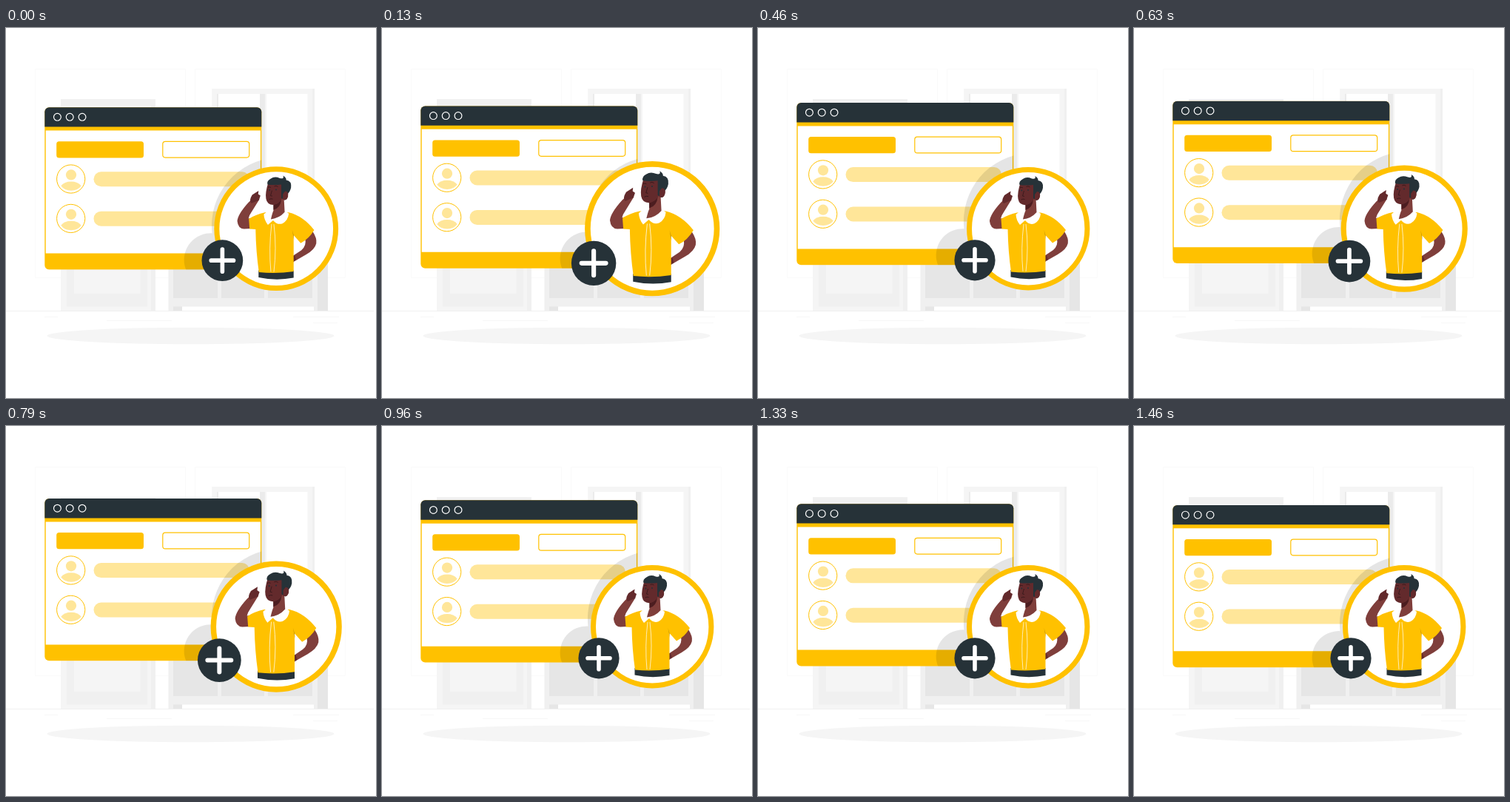
Animation of 500x500 px, one loop 1500 ms. Source, as an HTML page:

```html
<!DOCTYPE html>
<html lang="en">
<head>
<meta charset="utf-8">
<title>Add user</title>
<style>
  html, body { margin: 0; width: 100%; height: 100%; overflow: hidden; background: #fff; }
  svg { display: block; width: 100%; height: 100%; }
</style>
</head>
<body>
<svg viewBox="0 0 500 500" fill="none">
  <defs>
    <clipPath id="windowShape"><rect x="52.3" y="107.3" width="293" height="219.3" rx="6"/></clipPath>
    <g id="row">
      <circle cx="87.7" cy="204.2" r="19.1" fill="#fff" stroke="#ffc100"/>
      <circle cx="88" cy="198.6" r="7.1" fill="#ffe699"/>
      <path d="M74.3 213.5Q79 207.6 88 207.6T101.7 213.5Q97 220 88 220T74.3 213.5Z" fill="#ffe699"/>
      <rect x="118.5" y="194.4" width="210.5" height="20" rx="10" fill="#ffe699"/>
    </g>
  </defs>

  <g id="room">
    <path d="M39.5 55.5H242.5V337.5H39.5ZM255.5 55.5H458.5V337.5H255.5Z" stroke="#fafafa"/>
    <path d="M74 96.500H202V383H74Z" fill="#f0f0f0"/>
    <path d="M74 96.500H196V383H74Z" fill="#f5f5f5"/>
    <path d="M74 96.500H202V105H74Z" fill="#f0f0f0"/>
    <path d="M82 110H191V376.500H82Z" fill="#f0f0f0"/>
    <path d="M92 120H181.500V359H92Z" fill="#f5f5f5"/>
    <path d="M278.500 82H417V300H278.500Z" fill="#f0f0f0"/>
    <path d="M278.500 82H414V300H278.500Z" fill="#f5f5f5"/>
    <path d="M287 89H343V300H287ZM352 89H407.500V300H352Z" fill="#fff"/>
    <path d="M343 89H350V300H343ZM285 89H287V300H285Z" fill="#ebebeb"/>
    <path d="M219.500 270H435V383H416V376.500H238V383H219.500Z" fill="#f0f0f0"/>
    <path d="M226 270H414V365H226ZM421 270H435V383H421ZM226 376.500H238V383H226Z" fill="#e6e6e6"/>
    <path d="M286 270H291V365H286ZM349 270H354V365H349Z" fill="#f0f0f0"/>
    <path d="M0 382.500H497" stroke="#f0f0f0"/>
    <path d="M52 390.500H70M136 395.500H224M388 390.500H450M415 398.500H448" stroke="#f7f7f7"/>
    <ellipse cx="249.500" cy="416" rx="194" ry="11.300" fill="#f5f5f5"/>
  </g>

  <g id="window">
    <g clip-path="url(#windowShape)">
      <path d="M52 107H346V327H52Z" fill="#ffc100"/>
      <path d="M53.700 138.700H343.900V304.700H53.700Z" fill="#fff"/>
      <path d="M52 107H346V133.700H52Z" fill="#263238"/>
      <g stroke="#fff" stroke-width="1.200">
        <circle cx="69.400" cy="120.500" r="4.900"/>
        <circle cx="86.200" cy="120.500" r="4.900"/>
        <circle cx="103" cy="120.500" r="4.900"/>
      </g>
      <rect x="68.200" y="153.300" width="117.800" height="22.300" rx="3.500" fill="#ffc100"/>
      <rect x="211.800" y="153.500" width="116.900" height="21.700" rx="3.500" fill="#fff" stroke="#ffc100" stroke-width="1.200"/>
      <use href="#row"/>
      <use href="#row" y="53.400"/>
      <path d="M365 175.500A92 92 0 1 1 318 346L292 346A36 36 0 1 1 278.500 277.500A92 92 0 0 1 365 175.500Z" fill="#000" opacity=".1"/>
    </g>
  </g>

  <g id="badge">
    <circle cx="365.200" cy="271.200" r="79.700" fill="#fff" stroke="#ffc100" stroke-width="7"/>
    <path d="M331 257L328 257.500Q329 253 332 249L342.500 232L337 228Q332 232 328 236Q313.500 252 313 261Q314 271 322 271.500L332 271Z" fill="#7f3e3b"/>
    <path d="M332 237Q328 234 333 226L341.500 220.500L341 225L344 227L342 233Z" fill="#632a2c"/>
    <path d="M404 285L414 275Q420 284 418.800 291Q417 299 405 306L390 314.500L387 308L399 300Q406 294 404 285Z" fill="#7f3e3b"/>
    <path d="M390 307.500L382 307.500L376.500 312L379 318.500L386 317.500L392 313Z" fill="#632a2c"/>
    <path d="M341.500 327H388.500V337Q365 341.500 341.500 336.500Z" fill="#263238"/>
    <path d="M350 249.500Q338 252 328.500 258L329.500 271.500L337.500 272Q338 302 342 329.500Q365 332 388.500 328.500L388.500 280L398 290.500Q409 285 416 273Q401 254 382 249.500Z" fill="#ffc100"/>
    <path d="M388.500 280L386.500 273L389 286Z" fill="#b38700"/>
    <path d="M359 265Q355 298 358 329M362 265Q366 297 362 329" stroke="#fff" stroke-width=".7"/>
    <path d="M354 247.500L348.500 252Q349 260 354 266L361 260Q367 267 374 264Q381 260 382 251L376 247Z" fill="#fff"/>
    <path d="M375.500 230L376.500 249Q369 257.500 358 258.500Q360 250 361.500 247V235Z" fill="#7f3e3b"/>
    <path d="M361.500 239Q368 238 372 232Q371 243 361.500 246Z" fill="#4c1d20"/>
    <path d="M355 208Q350 223 351.500 231Q353 239 361 239.200Q369 238 373 231Q380 236 381 226Q382 216 375 208Z" fill="#632a2c"/>
    <path d="M353.500 212Q352 207 358 204Q363 200.500 370 203.500Q376 205 374.500 200Q379 203 378.500 206Q386 207 385 216Q384 222 379 226L377 233L372 230V212Q362 213 353.500 212Z" fill="#263238"/>
    <path d="M377 221Q382 221 381 228Q379 234 374 232V225Z" fill="#632a2c"/>
    <path d="M354 216Q356 214.500 358 216M362.500 214.500Q365 213 367.500 215M355.500 232Q358 230.500 360.500 231.500M359.500 220L357.500 227L360 227.500" stroke="#33171a" stroke-width=".8"/>
    <circle cx="356.300" cy="219.500" r="1" fill="#263238"/>
    <circle cx="365" cy="219" r="1" fill="#263238"/>
    <circle cx="293" cy="313.800" r="27.600" fill="#263238"/>
    <path d="M278 313.800H308M293 298.800V328.800" stroke="#fff" stroke-width="5.600" stroke-linecap="round"/>
  </g>
</svg>
<script>
const DURATION = 1500, LEAD = 12;
const CENTER = [365.2, 271.2];
const panel = document.getElementById('window');
const badge = document.getElementById('badge');

// Linear heartbeat: [progress, scale]
const beat = [[0, 1], [.1, 1.1], [.3, 1], [.4, 1], [.5, 1.1], [.6, 1], [1, 1]];

function interpolate(keys, p) {
  const i = keys.findIndex(([at]) => at > p);
  const [p0, v0] = keys[i - 1], [p1, v1] = keys[i];
  return v0 + (v1 - v0) * (p - p0) / (p1 - p0);
}

function draw() {
  const p = ((performance.now() + LEAD) % DURATION) / DURATION;
  const lift = 10 * (1 - Math.abs(1 - 2 * p));
  const scale = interpolate(beat, p);
  const [x, y] = CENTER;
  panel.setAttribute('transform', `translate(0 ${-lift})`);
  badge.setAttribute('transform', `translate(${x} ${y}) scale(${scale}) translate(${-x} ${-y})`);
  requestAnimationFrame(draw);
}
draw();
</script>
</body>
</html>
```
